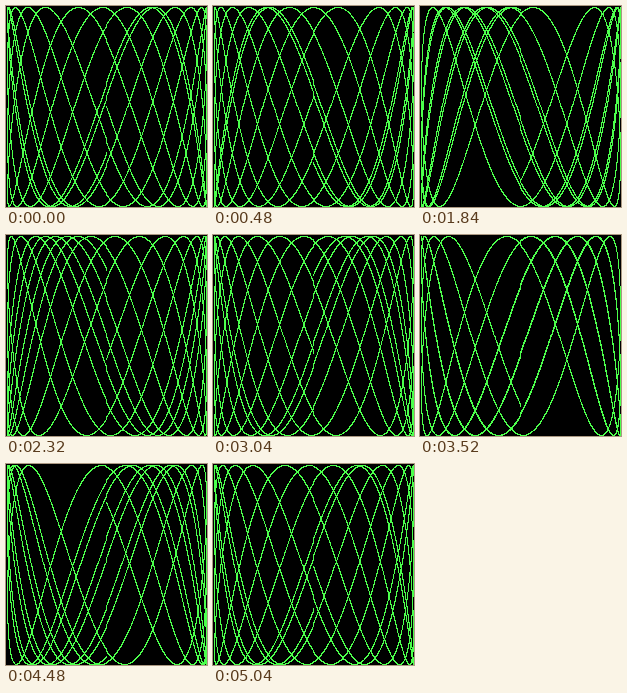
These frames come from a looping animation (201 by 201 pixels, 5.12 s). An HTML page with a canvas:

```html
<!DOCTYPE html>
<html lang="en">
<head>
<meta charset="utf-8">
<title>Lissajous</title>
<style>
  html, body { margin: 0; width: 100%; height: 100%; overflow: hidden; background: #000; }
  canvas { display: block; }
</style>
</head>
<body>
<canvas id="stage" width="201" height="201"></canvas>
<script>
const CYCLES = 5;         // full oscillations of x
const STEP = 0.001;       // angular resolution
const RADIUS = 100;
const SIZE = 2 * RADIUS + 1;
const FREQ = 2.885;       // frequency of y relative to x
const FRAMES = 64;
const DELAY = 80;         // ms per frame
const PHASE_STEP = 0.1;
const BLACK = 0xff000000;
const GREEN = 0xff4cff4c;

const ctx = document.getElementById('stage').getContext('2d');
const image = ctx.createImageData(SIZE, SIZE);
const pixels = new Uint32Array(image.data.buffer);

// Rounding truncates toward zero, so the figure spans 1 to 200.
const toPixel = v => RADIUS + Math.trunc(v * RADIUS + 0.5);

function draw(phase) {
  pixels.fill(BLACK);
  for (let t = 0; t < CYCLES * 2 * Math.PI; t += STEP) {
    const x = toPixel(Math.sin(t));
    const y = toPixel(Math.sin(t * FREQ + phase));
    pixels[y * SIZE + x] = GREEN;
  }
  ctx.putImageData(image, 0, 0);
}

let shown = -1;
function tick() {
  const frame = Math.floor(performance.now() / DELAY) % FRAMES;
  if (frame !== shown) {
    shown = frame;
    draw(frame * PHASE_STEP);
  }
  requestAnimationFrame(tick);
}
tick();
</script>
</body>
</html>
```
